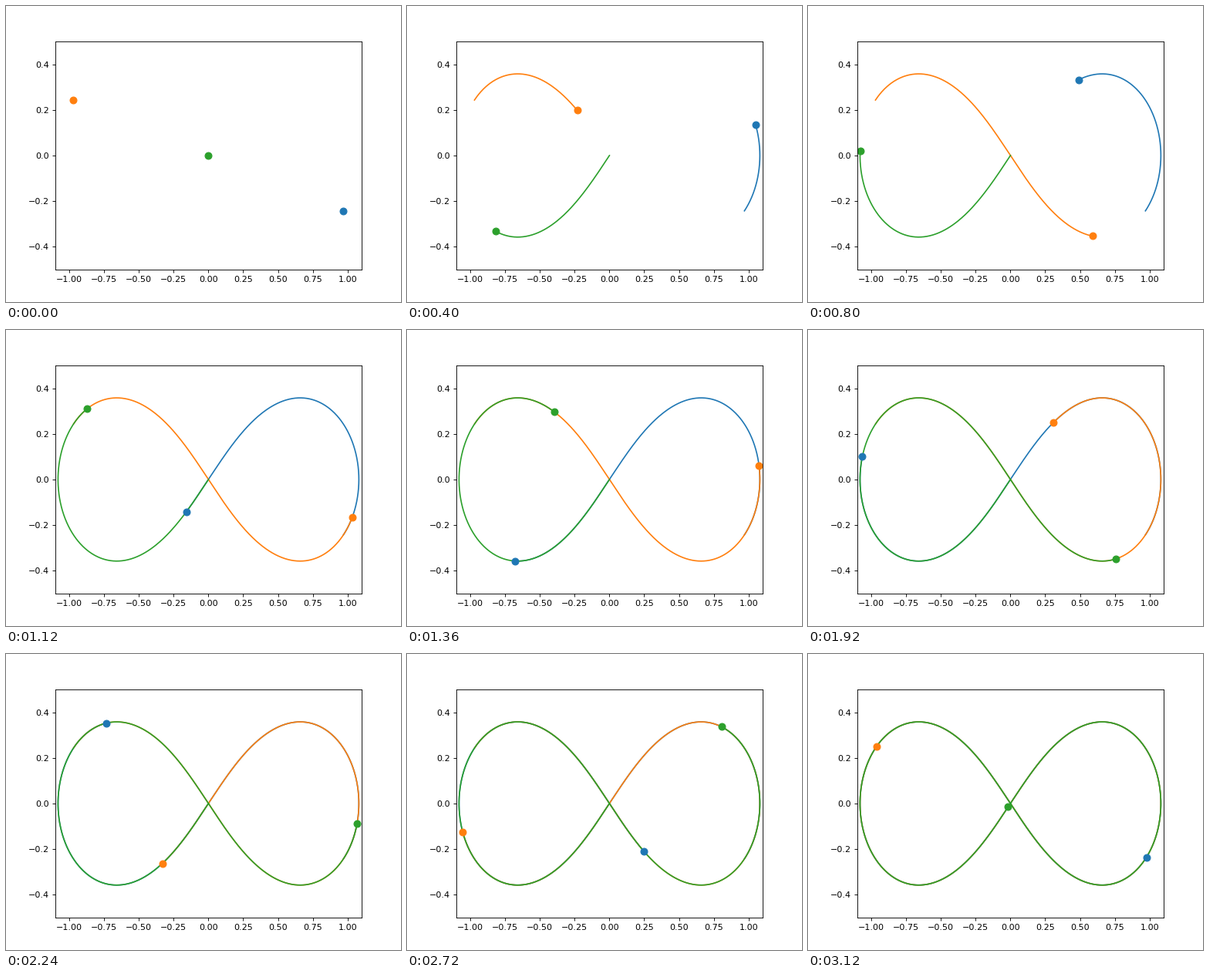
A matplotlib script that plays this animation: 512 px wide and 384 px high, repeating every 3200 ms.

```python
import numpy as np
import matplotlib.pyplot as plt
from matplotlib.animation import FuncAnimation

FRAMES = 40
INTERVAL = 80
STEP = 0.16265   # simulated time per frame
SUB = 40         # integration steps per frame


def accel(pos):
    """Mutual gravity of three unit masses."""
    acc = np.zeros_like(pos)
    for i, j in ((0, 1), (0, 2), (1, 2)):
        d = pos[j] - pos[i]
        pull = d / np.hypot(*d) ** 3
        acc[i] += pull
        acc[j] -= pull
    return acc


def deriv(state):
    return np.array([state[1], accel(state[0])])


def rk4(state, h):
    k1 = deriv(state)
    k2 = deriv(state + h / 2 * k1)
    k3 = deriv(state + h / 2 * k2)
    k4 = deriv(state + h * k3)
    return state + h / 6 * (k1 + 2 * k2 + 2 * k3 + k4)


def solve():
    """Positions along the figure-eight orbit, shape (time, body, xy)."""
    p = np.array([0.97000436, -0.24308753])
    v = np.array([-0.93240737, -0.86473146])
    state = np.array([[p, -p, 0 * p], [-v / 2, -v / 2, v]])
    path = [state[0]]
    for _ in range((FRAMES - 1) * SUB):
        state = rk4(state, STEP / SUB)
        path.append(state[0])
    return np.array(path)


path = solve()

fig, ax = plt.subplots(figsize=(6.4, 4.8), dpi=80)
ax.set_xlim(-1.1, 1.1)
ax.set_ylim(-0.5, 0.5)
trails = [ax.plot([], [], color=f"C{i}")[0] for i in range(3)]
dots = [ax.plot([], [], "o", color=f"C{i}", markersize=8)[0] for i in range(3)]


def update(frame):
    now = frame * SUB
    for i, (trail, dot) in enumerate(zip(trails, dots)):
        trail.set_data(path[:now + 1, i, 0], path[:now + 1, i, 1])
        dot.set_data(path[now:now + 1, i, 0], path[now:now + 1, i, 1])
    return trails + dots


anim = FuncAnimation(fig, update, frames=FRAMES, interval=INTERVAL, repeat=True)
plt.show()
```
